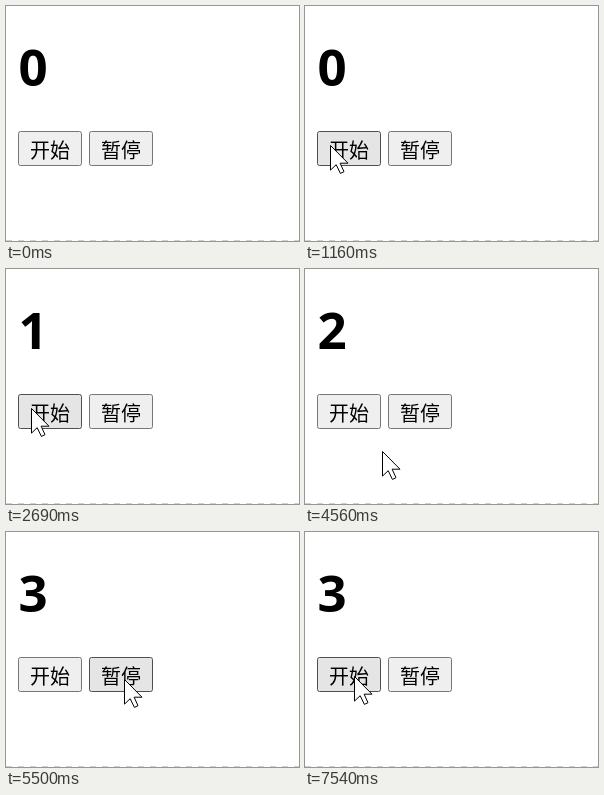
Animation of 293 by 235 pixels, one loop 8000 ms. Source, as an HTML page with a canvas:

```html
<!DOCTYPE html>
<html lang="zh">
<head>
<meta charset="utf-8">
<style>
html, body { margin: 0; width: 100%; height: 100%; overflow: hidden; background: #fff; }
canvas { display: block; }
</style>
</head>
<body>
<canvas id="stage" width="293" height="235"></canvas>
<script>
const ctx = document.getElementById('stage').getContext('2d');
const LOOP = 8000, STEP = 70;
const FIRST_COUNT = 2690, COUNT_EVERY = 995, LAST_COUNT = 3;

const clicks = [{ start: 1560, end: 1700 }, { start: 5430, end: 5500 }, { start: 7460, end: 7540 }];
const buttons = [{ x: 12, label: '开始' }, { x: 83, label: '暂停' }];
const BTN = { y: 125, w: 64, h: 35 };

// Each pointer move is one curve: from, bend, to
const moves = [
  { start: 530, end: 1160, from: [275, 150], bend: [36, 236], to: [25, 139] },
  { start: 4540, end: 4960, from: [77, 182], bend: [112, 197], to: [118, 147] },
  { start: 6230, end: 6930, from: [118, 147], bend: [96, 240], to: [49, 144] }
];

const easeOut = p => 1 - (1 - p) ** 1.4;
const curve = (a, b, c, u) => (1 - u) ** 2 * a + 2 * u * (1 - u) * b + u * u * c;

function pointerAt(t) {
  const move = moves.filter(m => t >= m.start).pop();
  if (!move) return null;
  const { start, end, from, bend, to } = move;
  const left = Math.max(0, Math.ceil((end - t) / STEP) * STEP);
  const u = easeOut(1 - left / (end - start));
  return from.map((a, i) => Math.round(curve(a, bend[i], to[i], u)));
}

function countAt(t) {
  const n = Math.floor((t - FIRST_COUNT) / COUNT_EVERY) + 1;
  return Math.min(LAST_COUNT, Math.max(0, n));
}

function paint(fill, line) {
  ctx.fillStyle = fill;
  ctx.fill();
  ctx.strokeStyle = line;
  ctx.lineWidth = 1;
  ctx.stroke();
}

function drawText(text, font, x, y) {
  ctx.fillStyle = '#000';
  ctx.font = font;
  ctx.fillText(text, x, y);
}

function drawButton({ x, label }, pointer, pressed) {
  const { y, w, h } = BTN;
  const over = pointer && pointer[0] >= x && pointer[0] < x + w &&
    pointer[1] >= y && pointer[1] < y + h;
  ctx.beginPath();
  ctx.roundRect(x + 0.5, y + 0.5, w - 1, h - 1, 2);
  if (!over) paint('#efefef', '#767676');
  else if (pressed) paint('#f5f5f5', '#8d8d8d');
  else paint('#e5e5e5', '#4f4f4f');
  drawText(label, '300 20px "Noto Sans CJK SC", "Noto Sans CJK", sans-serif', x + 12, 152);
}

function drawPointer([x, y]) {
  const outline = [[0, 0], [0, 24.6], [5.7, 19.2], [9.9, 27.9], [13.5, 26.2], [9.6, 17.7], [17.5, 17.7]];
  ctx.beginPath();
  for (const [px, py] of outline) ctx.lineTo(x + 0.5 + px, y + 0.5 + py);
  ctx.closePath();
  paint('#fff', '#000');
}

function draw(t) {
  ctx.fillStyle = '#fff';
  ctx.fillRect(0, 0, 293, 235);

  ctx.fillStyle = '#d0d0d0';
  for (let x = 0; x < 293; x += 12) ctx.fillRect(x, 234, 6, 1);

  drawText(countAt(t), 'bold 51px "Open Sans", "Noto Sans", sans-serif', 12.5, 80);

  const pointer = pointerAt(t);
  const pressed = clicks.some(c => t >= c.start && t < c.end);
  for (const b of buttons) drawButton(b, pointer, pressed);
  if (pointer) drawPointer(pointer);
}

const begin = performance.now();
function tick() {
  draw((performance.now() - begin) % LOOP);
  requestAnimationFrame(tick);
}
tick();
</script>
</body>
</html>
```
